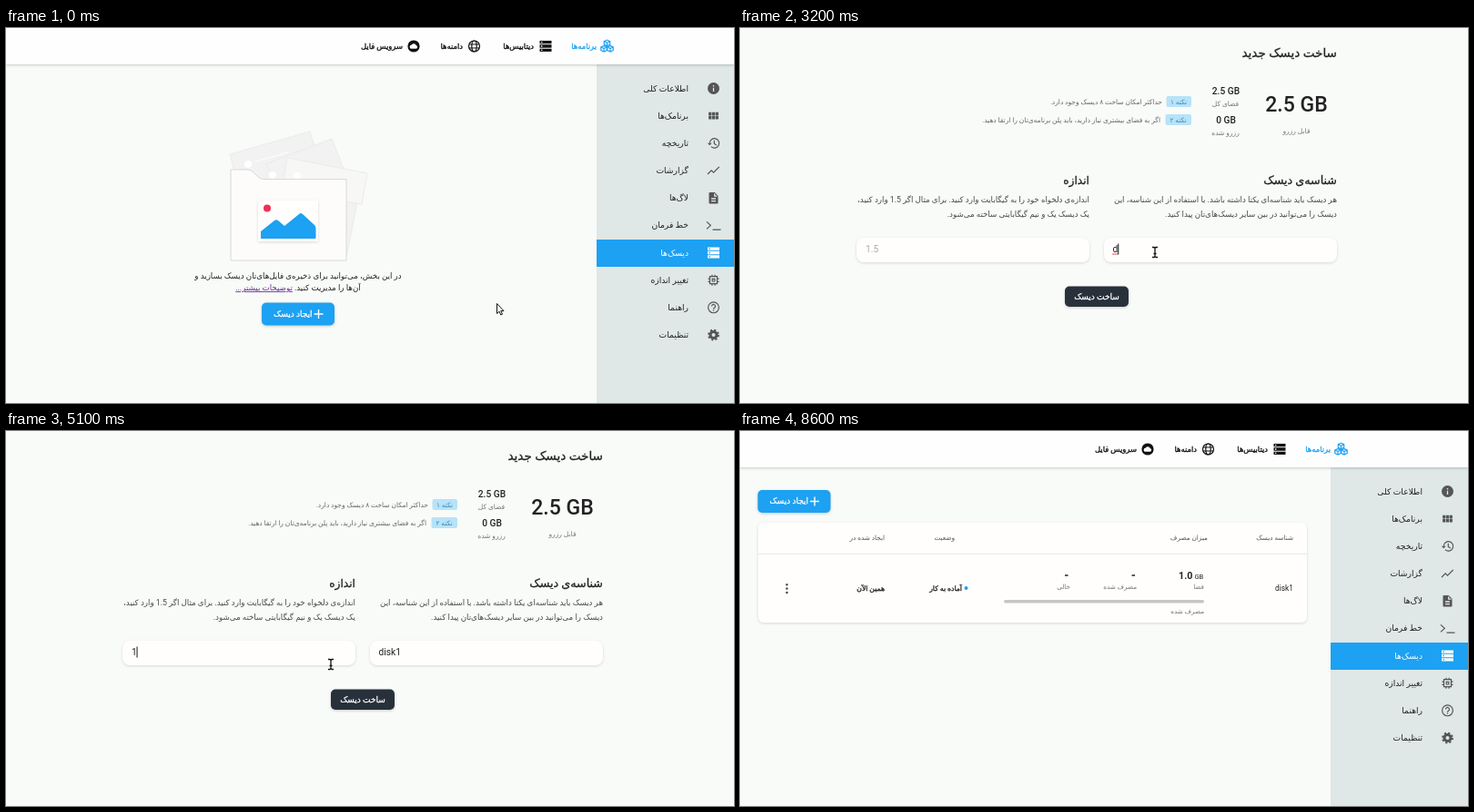
An HTML page that plays this animation: 800x413 px, repeating every 8.7 s.

```html
<!DOCTYPE html>
<html lang="fa">
<head>
<meta charset="utf-8">
<style>
html, body { margin: 0; width: 100%; height: 100%; overflow: hidden; background: #f8fbf8 }
svg { display: block; width: 800px; height: 413px; font-family: Roboto, "DejaVu Sans", sans-serif }
text { fill: currentColor; direction: rtl; white-space: pre }
.m { stroke: currentColor; stroke-width: .3 }
.l { direction: ltr }
.c { text-anchor: middle }
.card { fill: #fffefd; filter: drop-shadow(0 1px 1.5px #0002) }
.line { fill: none; stroke: currentColor; stroke-width: 1.2 }
.cut { fill: none; stroke: var(--bg); stroke-width: 1.3 }
.btn { filter: drop-shadow(0 1px 1.5px #0003) }
</style>
</head>
<body>
<svg viewBox="0 0 800 413" color="#222">
  <defs>
    <g id="storage">
      <path class="line" style="stroke-width:3.3" d="M-6.5-4.3H6.5M-6.5 0H6.5M-6.5 4.3H6.5"/>
      <path class="cut" d="M-5-4.3h1.4M-5 0h1.4M-5 4.3h1.4"/>
    </g>
    <path id="cube" class="line" d="M0-3.4l3.2 1.4v3.6L0 3.2l-3.2-1.6V-2zM-3.2-2L0-.5 3.2-2M0-.5v3.7"/>
    <g id="create" class="m" color="#fff">
      <rect class="btn" width="80" height="25" rx="5" fill="#1da1f2" stroke="none"/>
      <path class="line" style="stroke-width:1.4" d="M57.5 12.5h10M62.5 7.5v10"/>
      <text x="55.5" y="15.3" font-size="9">ایجاد دیسک</text>
    </g>
  </defs>

  <g id="side" style="--bg:#dfe7e7">
    <path d="M649 40h151v373H649z" fill="#dfe7e7"/>
    <path d="M649 233h151v30H649z" fill="#1da1f2"/>
    <g id="menu" font-size="9.2"></g>
  </g>

  <g id="header" style="--bg:#fffefe" color="#111">
    <path d="M0 0h800v40H0z" fill="#fffefe" style="filter:drop-shadow(0 1px 1.5px #0003)"/>
    <g class="m" font-size="8.4">
      <text x="649" y="23" color="#1da1f2" stroke="#1da1f2">برنامه&zwnj;ها</text>
      <text x="580" y="23">دیتابیس&zwnj;ها</text>
      <text x="502" y="23">دامنه&zwnj;ها</text>
      <text x="436" y="23">سرویس فایل</text>
    </g>
    <g transform="translate(660.5 20)" color="#1da1f2">
      <use href="#cube" y="-3.3"/><use href="#cube" x="-3.5" y="3"/><use href="#cube" x="3.5" y="3"/>
    </g>
    <use href="#storage" x="593" y="20"/>
    <g class="line" transform="translate(514.5 20)">
      <circle r="6"/><ellipse rx="2.7" ry="6"/><path d="M-5.6-2H5.6M-5.6 2H5.6"/>
    </g>
    <g transform="translate(448 20)">
      <circle r="6.6" fill="#111"/>
      <path d="M-2.3 2.8a2 2 0 0 1-.2-4 2.8 2.8 0 0 1 5.2.3A1.9 1.9 0 0 1 2.6 2.8z" fill="#fff"/>
    </g>
  </g>

  <g id="intro">
    <g fill="#f1f2f1" stroke="#e6e7e6" stroke-width=".7">
      <path d="M246 139l88-25 15 48-90 25z"/>
      <path d="M285 150l73-28 24 60-60 20z"/>
      <path d="M366 180l21 8-13 64z"/>
      <path d="M309 143l88 17-6 34-88-14z" fill="#f7f7f6"/>
    </g>
    <g fill="#fff"><circle cx="266" cy="150" r="4"/><circle cx="293" cy="162" r="4"/><circle cx="320" cy="163" r="4"/></g>
    <path d="M274 147l36-10" stroke="#fff"/>
    <path d="M247 156h18q4 0 7 3l4 4q3 3.5 7 3.5h91V256H247z" fill="#fdfcfb" stroke="#d9d9d8"/>
    <path d="M277 190h66v45h-66z" class="card"/>
    <circle cx="287" cy="198.5" r="4" fill="#ef3054"/>
    <path d="M280 232v-8l15-12q2-1.6 4 0l7 6 16-13q2-1.8 4 0l13 12q1.5 1.5 1.5 4v10q0 1-1 1z" fill="#1da1f2"/>
    <g class="c" font-size="8.7">
      <text x="321" y="276">در این بخش، می&zwnj;توانید برای ذخیره&zwnj;ی فایل&zwnj;های&zwnj;تان دیسک بسازید و</text>
      <text x="321" y="289">آن&zwnj;ها را مدیریت کنید. <tspan fill="#6a2c91" text-decoration="underline">توضیحات بیشتر...</tspan></text>
    </g>
    <use href="#create" id="introButton" x="281" y="302.5"/>
  </g>

  <g id="form">
    <g class="m">
      <text x="656" y="31.5" font-size="13.6">ساخت دیسک جدید</text>
      <text x="656" y="172" font-size="12.7">شناسه&zwnj;ی دیسک</text>
      <text x="384" y="172" font-size="12.2">اندازه</text>
    </g>
    <g class="c" font-weight="500">
      <text class="l" x="611.5" y="91.5" font-size="23">2.5 GB</text>
      <text class="l" x="534" y="73" font-size="10.2">2.5 GB</text>
      <text class="l" x="534" y="105.3" font-size="10.2">0 GB</text>
    </g>
    <g class="c" font-size="7.5" color="#777">
      <text x="611.5" y="115.5">قابل رزرو</text>
      <text x="533.5" y="85.5">فضای کل</text>
      <text x="533.5" y="118">رزرو شده</text>
    </g>
    <g fill="#b7e3f8">
      <rect x="468.5" y="75" width="27.5" height="12" rx="2"/><rect x="467.5" y="95" width="28.5" height="12" rx="2"/>
    </g>
    <g class="c" font-size="7.3" color="#3a86b5">
      <text x="482" y="83.7">نکته ۱</text><text x="481.5" y="103.7">نکته ۲</text>
    </g>
    <g font-size="7.5" color="#666">
      <text x="464" y="83.5">حداکثر امکان ساخت ۸ دیسک وجود دارد.</text>
      <text x="462" y="103.5">اگر به فضای بیشتری نیاز دارید، باید پلن برنامه&zwnj;ی&zwnj;تان را ارتقا دهید.</text>
    </g>
    <g font-size="8.7" color="#484848">
      <text x="656" y="192.3">هر دیسک باید شناسه&zwnj;ای یکتا داشته باشد. با استفاده از این شناسه، این</text>
      <text x="656" y="208.3">دیسک را می&zwnj;توانید در بین سایر دیسک&zwnj;های&zwnj;تان پیدا کنید.</text>
      <text x="384" y="192.3">اندازه&zwnj;ی دلخواه خود را به گیگابایت وارد کنید. برای مثال اگر 1.5 وارد کنید،</text>
      <text x="384" y="208.3">یک دیسک یک و نیم گیگابایتی ساخته می&zwnj;شود.</text>
    </g>
    <rect class="card" x="128" y="231" width="256" height="27" rx="8"/>
    <rect class="card" x="400" y="231" width="256" height="27" rx="8"/>
    <g font-size="10.2">
      <text class="l" id="name" x="409.5" y="247"></text>
      <text class="l" id="size" x="138" y="247"></text>
    </g>
    <path id="spell" stroke="#e33" stroke-width="1.3" stroke-dasharray="1.2 .8"/>
    <path id="caret" stroke="#111"/>
    <rect id="formButton" class="btn" x="357" y="284.5" width="70" height="22.5" rx="5" fill="#28303b"/>
    <text class="m c" x="392" y="298.5" font-size="9" color="#fff">ساخت دیسک</text>
  </g>

  <g id="list">
    <use href="#create" x="19.5" y="65"/>
    <rect class="card" x="20" y="101" width="603" height="110" rx="6"/>
    <path d="M20 135.3h603" stroke="#e4e6e4"/>
    <g font-size="7.3" color="#555">
      <text x="608" y="120">شناسه دیسک</text>
      <text x="514" y="120">میزان مصرف</text>
      <text x="236" y="120">وضعیت</text>
      <text x="159" y="120">ایجاد شده در</text>
    </g>
    <g font-size="7.2" color="#777">
      <text x="510" y="174">فضا</text>
      <text x="436" y="174">مصرف شده</text>
      <text x="363" y="174">خالی</text>
      <text x="510" y="201">مصرف شده</text>
    </g>
    <text class="l" x="588" y="176" font-size="8.3">disk1</text>
    <text class="l" x="482" y="162.5" font-size="10.7" font-weight="700">1.0<tspan font-size="7.6" font-weight="400" dx="2">GB</tspan></text>
    <path d="M430.5 159h3.5M357 159h3.5" stroke="#222" stroke-width="1.4"/>
    <rect x="290" y="186" width="220" height="3.6" rx="1.8" fill="#c5c6c5"/>
    <g class="m" font-size="7.7">
      <text x="244" y="176">آماده به کار</text><text x="159" y="176">همین الآن</text>
    </g>
    <circle cx="248.5" cy="173" r="2" fill="#1da1f2"/>
    <path d="M51.5 169.3v9" stroke="#444" stroke-width="2.5" stroke-linecap="round" stroke-dasharray="0 4.3"/>
  </g>

  <circle id="loader" cx="401.5" r="1.1" fill="#222"/>
  <g id="cursor">
    <path id="arrow" d="M.5.5v11l2.5-2.3 1.8 3.8 1.7-.8-1.7-3.6h3.2z" fill="#fff" stroke="#111"/>
    <g id="beam" fill="none">
      <path id="beamShape" d="M-3-5.5h2l1 1 1-1h2M-3 5.5h2l1-1 1 1h2M0-4.5v9M-1.5 1.5h3" stroke="#fff" stroke-width="3"/>
      <path d="M-3-5.5h2l1 1 1-1h2M-3 5.5h2l1-1 1 1h2M0-4.5v9M-1.5 1.5h3" stroke="#111" stroke-width="1.3"/>
    </g>
  </g>
</svg>
<script>
const LOOP = 8700;
const $ = id => document.getElementById(id);
const line = d => `<path class="line" d="${d}"/>`;
const cut = d => `<path class="cut" d="${d}"/>`;

const menu = [
  ['اطلاعات کلی', '<circle r="6.5" fill="currentColor"/>' + cut('M0-.8V3.4M0-3.6v1.5')],
  ['برنامک&zwnj;ها', '<path stroke="currentColor" stroke-width="3.7" stroke-dasharray="3.2 .6" d="M-5.4-2.1H5.4M-5.4 2.1H5.4"/>'],
  ['تاریخچه', line('M-4.2 0A5.2 5.2 0 1 1-2.6 3.8M.8-3V.6l2.6 1.6') + '<path fill="currentColor" d="M-6.6 0h4.8l-2.4 2.4z"/>'],
  ['گزارشات', line('M-6.5 4l4.2-4.2L0 2.2 6.2-4')],
  ['لاگ&zwnj;ها', '<path fill="currentColor" d="M-4-6.2H1.3L5-2.5V5.2q0 1-1 1h-8q-1 0-1-1V-5.2q0-1 1-1z"/>' + cut('M-2.5.8H2.5M-2.5 3.4H2.5M1.2-5v3H4')],
  ['خط فرمان', line('M-7.5-4l4.3 4-4.3 4M-1 4.8H8')],
  ['دیسک&zwnj;ها', '<use href="#storage" style="--bg:#1da1f2"/>'],
  ['تغییر اندازه', line('M-4-4h8v8h-8zM-1.3-1.3h2.6v2.6h-2.6zM-1.6-4v-2M1.6-4v-2M-1.6 4v2M1.6 4v2M-4-1.6h-2M-4 1.6h-2M4-1.6h2M4 1.6h2')],
  ['راهنما', '<circle class="line" r="5.9"/>' + line('M-2-1.4a2 2 0 1 1 3.2 1.6Q0 1 0 2M0 2.7v1.3')],
  ['تنظیمات', '<g fill="none" stroke="currentColor"><circle r="3.5" stroke-width="3"/><circle r="5.4" stroke-width="2" stroke-dasharray="2.12"/></g>'],
];
$('menu').innerHTML = menu.map(([label, icon], i) => {
  const y = 66.5 + 30.17 * i, active = i === 6;
  return `<text x="750" y="${y + 3}" color="${active ? '#fff' : '#222'}">${label}</text>
    <g transform="translate(777.5 ${y})" color="${active ? '#fff' : '#555'}">${icon}</g>`;
}).join('');

// Pointer path: time, x, y
const path = [
  [0, 539, 303], [900, 298, 321], [2000, 298, 321], [2800, 456, 247], [3300, 456, 247],
  [3800, 369, 249], [4600, 369, 249], [4900, 357, 257], [5100, 357, 257], [5600, 391.5, 273],
  [6200, 391.5, 273], [6900, 604, 384], [7100, 618, 416],
];

function pointerAt(t) {
  const i = path.findIndex(p => p[0] > t);
  if (i < 0) return [618, 420];
  const [t0, x0, y0] = path[i - 1], [t1, x1, y1] = path[i];
  const u = (t - t0) / (t1 - t0), k = u * u * (3 - 2 * u);
  return [x0 + (x1 - x0) * k, y0 + (y1 - y0) * k];
}

const show = (id, on) => $(id).style.display = on ? '' : 'none';
const between = (t, a, b) => t >= a && t < b;

function draw(t) {
  show('intro', t < 1900);
  show('header', t < 1900 || t >= 6000);
  show('side', t < 1900 || t >= 6400);
  show('form', between(t, 2200, 6000));
  show('list', t >= 6700);
  show('loader', between(t, 1900, 2200) || between(t, 6000, 6700));
  $('loader').setAttribute('cy', t < 4000 ? 57 : 81);
  $('introButton').style.opacity = between(t, 1000, 1900) ? .92 : 1;
  $('formButton').style.opacity = t >= 5500 ? .94 : 1;

  // Typing in the two fields
  const typed = t >= 4800, inName = t < 4100;
  $('name').textContent = 'disk1'.slice(0, Math.max(0, Math.floor((t - 3100) / 100)));
  $('size').textContent = typed ? '1' : '1.5';
  $('size').setAttribute('color', typed ? '#222' : '#aaa');
  const width = id => $(id).getComputedTextLength();
  const caretX = inName ? 410 + width('name') : 138 + (typed ? width('size') + .3 : 0);
  $('caret').setAttribute('d', `M${caretX} 237.5v12`);
  $('spell').setAttribute('d', `M409.5 249h${width('name')}`);
  show('caret', between(t, 3200, 5600));
  show('spell', between(t, 3200, 4100));

  const beam = between(t, 2600, 5250);
  show('beam', beam);
  show('arrow', !beam);
  $('cursor').setAttribute('transform', `translate(${pointerAt(t)})`);
}

function frame() {
  draw(performance.now() % LOOP);
  requestAnimationFrame(frame);
}
frame();
</script>
</body>
</html>
```
